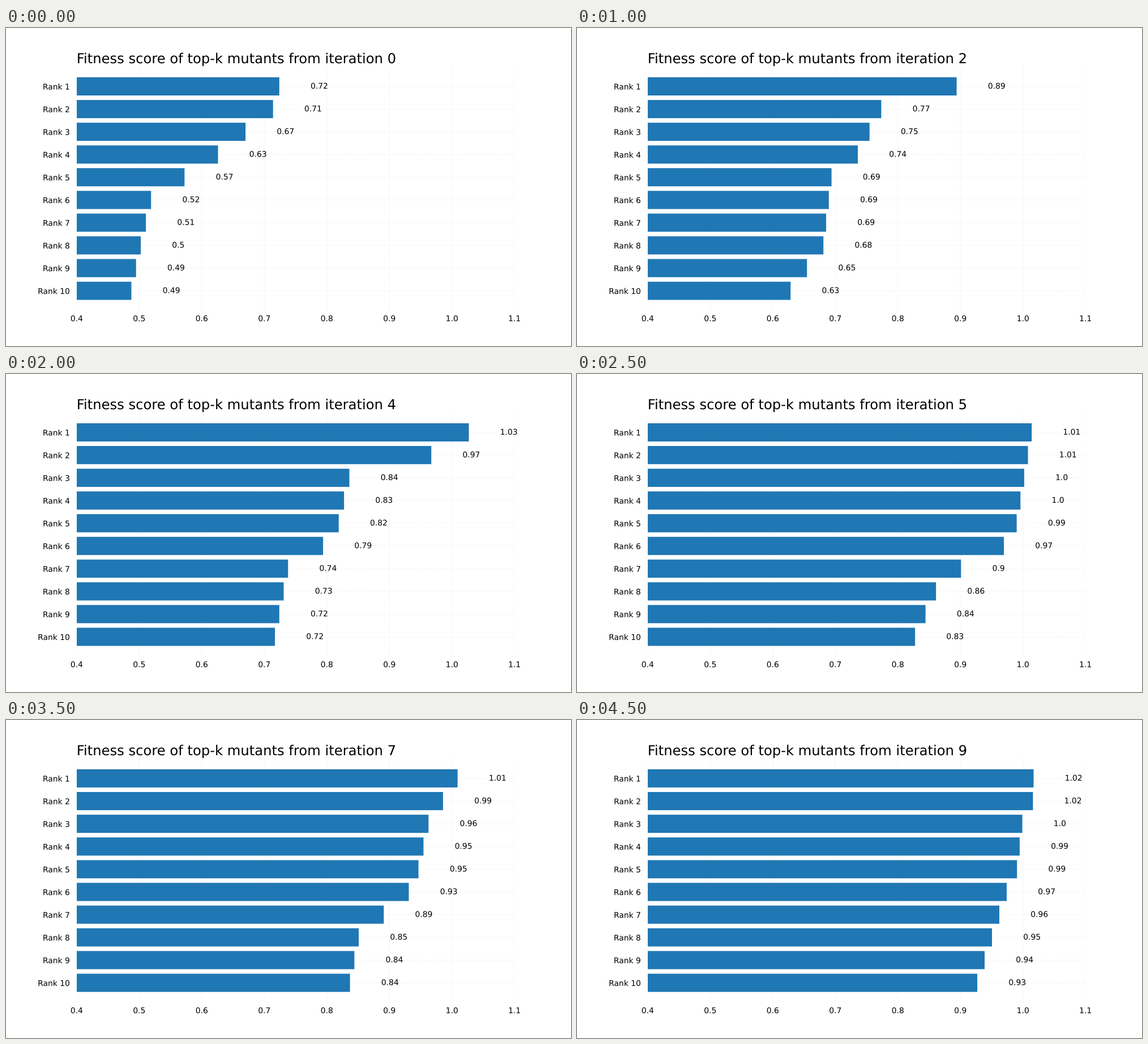
These frames come from a looping animation (998x561 px, 5000 ms). A matplotlib script:

```python
import matplotlib.pyplot as plt
import numpy as np
from matplotlib.animation import FuncAnimation
from matplotlib.patheffects import Normal

DPI = 62.375
LEFT = 0.4
SIZE = 16
RANKS = np.arange(1, 11)


def curve(**knots):
    """Scores of all ranks, straight between the given ones (r1=..., r10=...)."""
    ranks = [int(name[1:]) for name in knots]
    return np.interp(RANKS, ranks, list(knots.values()))


def blend(a, b, share):
    return a + (b - a) * share


start = curve(r1=.724, r2=.714, r4=.626, r6=.519, r8=.5025, r10=.4875)
spread = curve(r1=.894, r2=.7735, r4=.736, r5=.694, r8=.681, r10=.6285)
peak = curve(r1=1.032, r5=.997, r7=.934, r8=.818, r9=.774, r10=.771)
drop = curve(r1=1.027, r2=.967, r3=.836, r5=.819, r6=.794, r7=.738, r10=.717)
rise = curve(r1=1.014, r5=.99, r6=.9695, r7=.901, r8=.861, r10=.8275)
settle = curve(r1=1.009, r3=.9625, r5=.9465, r6=.931, r8=.851, r10=.837)
final = curve(r1=1.017, r2=1.016, r3=.999, r5=.9905, r6=.974, r10=.927)

SCORES = [
    start, blend(start, spread, 0.26), spread, peak, drop, rise,
    blend(rise, settle, 0.5) - 0.053, settle, blend(settle, final, 0.59), final,
]

plt.rcParams["font.family"] = "DejaVu Sans"
plt.rcParams["path.effects"] = [Normal()]  # text as outlines, placed between pixels

fig, ax = plt.subplots(figsize=(16, 561.01 / DPI), dpi=DPI)
fig.subplots_adjust(left=0.125, right=0.9, bottom=0.11, top=0.88)

bars = ax.barh(RANKS, 0 * RANKS, left=LEFT, height=0.8, color="#1f77b4", snap=False)
labels = [ax.text(LEFT, rank + 0.1, "", fontsize=SIZE) for rank in RANKS]
title = ax.set_title("", loc="left", fontsize=28)

ax.set_xlim(LEFT, 1.1)
ax.set_ylim(10.89, 0.11)
ax.set_xticks(np.linspace(0.4, 1.1, 8))
ax.xaxis.set_major_formatter("{x:.1f}")
ax.set_yticks(RANKS, [f"Rank {rank}" for rank in RANKS])
ax.xaxis.set_ticks_position("none")
ax.yaxis.set_ticks_position("none")
ax.tick_params(axis="x", pad=4.5, labelsize=SIZE)
ax.tick_params(axis="y", pad=10, labelsize=SIZE)
ax.grid(True, color="grey", linestyle="-.", linewidth=0.5, alpha=0.2)
for spine in ax.spines.values():
    spine.set_visible(False)


def draw(step):
    title.set_text(f"Fitness score of top-k mutants from iteration {step}")
    for bar, label, score in zip(bars, labels, SCORES[step]):
        bar.set_width(score - LEFT)
        label.set_x(score + 0.05)
        label.set_text(str(round(float(score), 2)))
    return [title, *bars, *labels]


anim = FuncAnimation(fig, draw, frames=len(SCORES), interval=500,
                     init_func=lambda: draw(0), repeat=True, repeat_delay=0)
plt.show()
```
